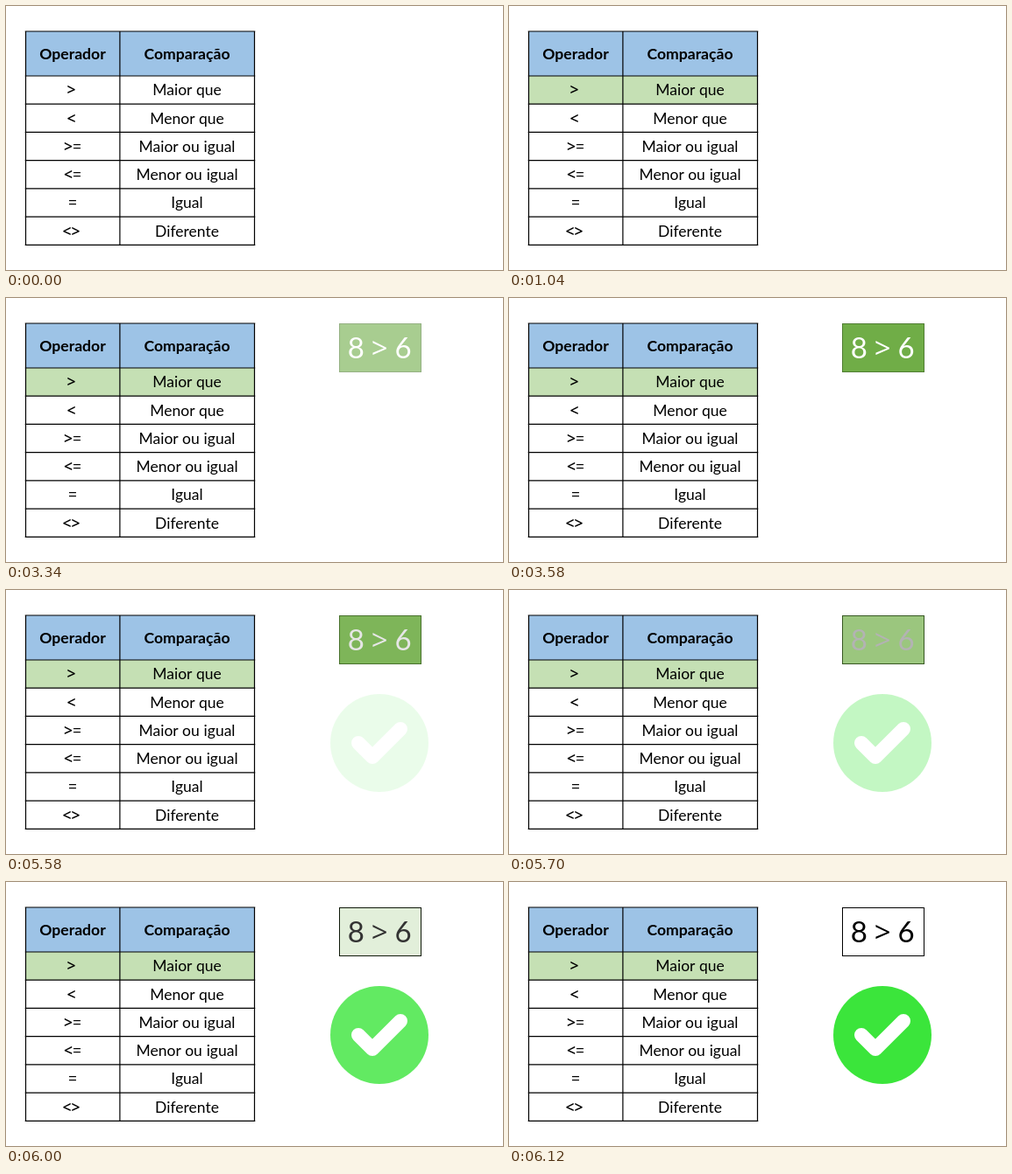
Animation of 567x302 px, one loop 8000 ms. Source, as an HTML page:

```html
<!DOCTYPE html>
<html lang="pt">
<head>
<meta charset="utf-8">
<style>
  html, body { margin: 0; width: 100%; height: 100%; overflow: hidden; background: #fff; }
  svg { display: block; width: 567px; height: 302px; }
  text { font-family: Lato, sans-serif; font-size: 17.5px; word-spacing: .3px; text-anchor: middle; }
  .head { font-size: 17.6px; font-weight: 700; }
  .op, .sign { font-family: "Open Sans", sans-serif; }
  .angle { font-weight: 600; }
  #sum { font-size: 33px; word-spacing: -.6px; }
</style>
</head>
<body>
<svg viewBox="0 0 567 302">
  <rect x="22.5" y="29" width="261" height="51" fill="#9dc3e6"/>
  <rect id="row" x="22.5" y="80" width="261" height="32.2" fill="#c5e0b4"/>
  <g id="table"></g>
  <g id="card">
    <rect id="box" x="380.5" y="29.5" width="93" height="55"/>
    <text id="sum" x="426.3" y="69">8 <tspan class="sign">&gt;</tspan> 6</text>
  </g>
  <g id="tick">
    <circle cx="426" cy="175" r="56" fill="#3be53b"/>
    <path d="M402 175L418 191L450 159" fill="none" stroke="#fff" stroke-width="16" stroke-linecap="round" stroke-linejoin="round"/>
  </g>
</svg>
<script>
const LOOP = 8000, STEP = 60, STEPS = 10;
const TOP = 29, BODY = 80, ROW = 32.22;
const $ = id => document.getElementById(id);

function add(tag, attrs, content = "") {
  const el = document.createElementNS("http://www.w3.org/2000/svg", tag);
  for (const key in attrs) el.setAttribute(key, attrs[key]);
  el.textContent = content;
  $("table").append(el);
  return el;
}

function buildTable() {
  const rows = [[">", "Maior que"], ["<", "Menor que"], [">=", "Maior ou igual"],
                ["<=", "Menor ou igual"], ["=", "Igual"], ["<>", "Diferente"]];
  const lines = [TOP, BODY, ...rows.map((_, i) => BODY + ROW * (i + 1))];
  const grid = lines.map(y => `M21.7 ${y}H284.3`).join("") +
               [22.5, 129.9, 283.5].map(x => `M${x} 28.4V274`).join("");
  add("path", { d: grid, stroke: "#000", "stroke-width": 1.2, fill: "none" });
  add("text", { x: 76, y: 61, class: "head" }, "Operador");
  add("text", { x: 206.5, y: 61, class: "head" }, "Comparação");
  rows.forEach(([op, label], i) => {
    const y = BODY + 22.4 + i * ROW;
    const cell = add("text", { x: op.includes("=") ? 76 : 74.5, y, class: "op" });
    for (const char of op) {
      const span = add("tspan", { class: char === "=" ? "" : "angle" }, char);
      cell.append(span);
    }
    add("text", { x: 206.5, y }, label);
  });
}

// Fades advance in ten equal steps, the first one visible at once.
function fade(t, start) {
  const step = Math.floor((t - start) / STEP + 1e-6) + 1;
  return Math.max(0, Math.min(STEPS, step)) / STEPS;
}

function mix(from, to, k) {
  return `rgb(${from.map((v, i) => Math.round(v + (to[i] - v) * k))})`;
}

function draw(t) {
  const white = [255, 255, 255], black = [0, 0, 0];
  const done = fade(t, 5580);
  $("row").setAttribute("opacity", fade(t, 500));
  $("card").setAttribute("opacity", fade(t, 3040));
  $("box").setAttribute("fill", mix([112, 173, 71], white, done));
  $("box").setAttribute("stroke", mix([80, 126, 50], black, done));
  $("sum").setAttribute("fill", mix(white, black, done));
  $("tick").setAttribute("opacity", done);
}

buildTable();
const origin = performance.now();
function tick() {
  draw((performance.now() - origin) % LOOP);
  requestAnimationFrame(tick);
}
tick();
</script>
</body>
</html>
```
